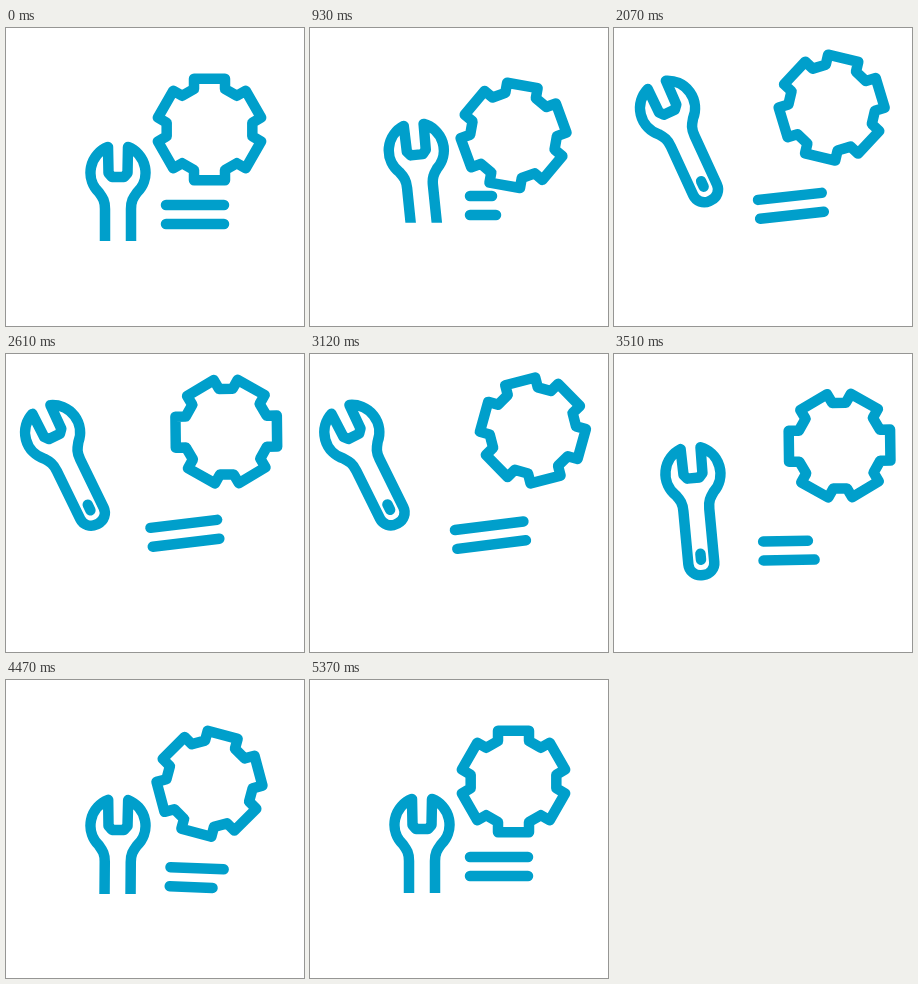
These frames come from a looping animation (298 px wide and 298 px high, 5.4 s). An HTML page:

```html
<!DOCTYPE html>
<html lang="en">
<head>
<meta charset="utf-8">
<title>Tools</title>
<style>
  html, body { margin: 0; width: 100%; height: 100%; overflow: hidden; background: #fff; }
  svg { display: block; width: 100vw; height: 100vh; }
  path { fill: none; stroke: #009fcb; stroke-width: 10.5; stroke-linejoin: round; }
  #hole, #bars path { stroke-linecap: round; }
</style>
</head>
<body>
<svg viewBox="0 0 298 298">
  <clipPath id="cut"><rect id="cutRect" width="298" height="213"/></clipPath>
  <path id="gear"/>
  <g clip-path="url(#cut)">
    <g id="wrench">
      <path id="body"/>
      <path id="hole"/>
    </g>
  </g>
  <g id="bars">
    <path id="bar0"/>
    <path id="bar1"/>
  </g>
</svg>
<script>
const LOOP = 5400, STEP = 30, START = 180, END = 5370;
const LEAVE = 930, AWAY = 1420, RETURN = 3060; // main beats in ms
const $ = id => document.getElementById(id);

// Progress from 0 to 1 between two times: straight, eased, or there and back
const ramp = (t, a, b) => Math.min(1, Math.max(0, (t - a) / (b - a)));
const ease = (t, a, b) => { const u = ramp(t, a, b); return u * u * (3 - 2 * u); };
const bump = (t, a, b) => Math.sin(Math.PI * ramp(t, a, b)) ** 2;

// Move out by `far`, drift on by `extra`, then come home by `home`
function trip(t, far, extra, leave, home, back = RETURN) {
  const out = far * ease(t, leave, AWAY) + extra * ramp(t, AWAY, RETURN);
  return out * (1 - ease(t, back, home));
}

function place(id, x, y, turn) {
  $(id).setAttribute("transform", `translate(${x} ${y}) rotate(${turn})`);
}

function gearPath() {
  const tooth = [[-15.5, -40.5], [-15.5, -50.7], [15.5, -50.7], [15.5, -40.5]];
  const points = [];
  for (let i = 0; i < 6; i++) {
    const c = Math.cos(i * Math.PI / 3), s = Math.sin(i * Math.PI / 3);
    for (const [x, y] of tooth) points.push([x * c - y * s, x * s + y * c]);
  }
  return `M${points.join("L")}Z`;
}

function wrenchPath(end) {
  const side = end - 12;
  return `M-13 ${side}V36C-13 28-15 25-19 19.5A27.5 27.5 0 0 1-10-26`
    + "L-9.5 0L-6 4H6L9.5 0L10-26A27.5 27.5 0 0 1 19 19.5"
    + `C15 25 13 28 13 36V${side}A12 12 0 0 1 1 ${end}H-1A12 12 0 0 1-13 ${side}Z`;
}

function drawGear(t) {
  const kick = 8 * bump(t, RETURN, 3900);
  const dip = 6 * bump(t, 700, 1160) + 3.5 * bump(t, 3840, 4740);
  const turn = 10 * ramp(t, START, LEAVE) + 133 * ramp(t, LEAVE, END)
    + 29 * ease(t, LEAVE, 1480) + 50 * ease(t, RETURN, 3800) + 18 * ramp(t, 4470, END);
  const x = 203.5 + trip(t, 11, 8, 910, 4140, 3200) + kick;
  const y = 101.5 + trip(t, -19.5, -6, 910, 3840) + dip;
  place("gear", x, y, turn);
}

function drawWrench(t) {
  const sag = 6 * bump(t, 3600, 4600);
  const x = 112 + trip(t, -50, -21, 800, 3920) - 5 * bump(t, 4480, 5000);
  const y = 145 + trip(t, -62.5, -5, 600, 3825) + sag;
  const tilt = trip(t, -23.2, -3.8, 690, 3690) + 0.4 * sag;
  place("wrench", x, y, tilt);

  // The closed end slides up into view, and is hidden again at home
  const open = ease(t, LEAVE, 1020) - ease(t, 3540, 3700);
  const cutAt = y + 68 + 16 * ease(t, 690, AWAY) * (1 - ease(t, RETURN, 3690));
  $("cutRect").setAttribute("height", cutAt + (270 - cutAt) * open);
  const extra = 42 * (1 - ease(t, 960, 1290));
  $("body").setAttribute("d", wrenchPath(101.5 + extra));
  $("hole").setAttribute("d", `M0 ${80 + extra}v6`);
}

function drawBars(t) {
  const sway = bump(t, 3900, 5000);
  const drop = 12 * (ease(t, RETURN, 3560) - ease(t, 4300, 5000));
  const lift = -9 * ease(t, START, LEAVE) * (1 - ease(t, RETURN, 4345));
  const x = 160 + trip(t, -16.5, 1.4, LEAVE, 4345) + 4.5 * sway;
  const y = 177 + lift + trip(t, 1.5, 6, LEAVE, 4345) + drop;
  place("bars", x, y, trip(t, -5.6, -1.7, LEAVE, 3660) + 2.3 * sway);

  for (let i = 0; i < 2; i++) {
    const shrink = bump(t, 330, 1530) + bump(t, RETURN, 4660 + 260 * i);
    const length = 58 + trip(t, 2.5, 9, LEAVE, 4345) - (36 - 4 * i) * shrink;
    $("bar" + i).setAttribute("d", `M0 ${19 * i}h${length}`);
  }
}

$("gear").setAttribute("d", gearPath());
const begin = performance.now();

function tick() {
  const now = (performance.now() - begin) % LOOP;
  const t = now < START ? 0 : Math.floor(now / STEP) * STEP;
  drawGear(t);
  drawWrench(t);
  drawBars(t);
  requestAnimationFrame(tick);
}
tick();
</script>
</body>
</html>
```
